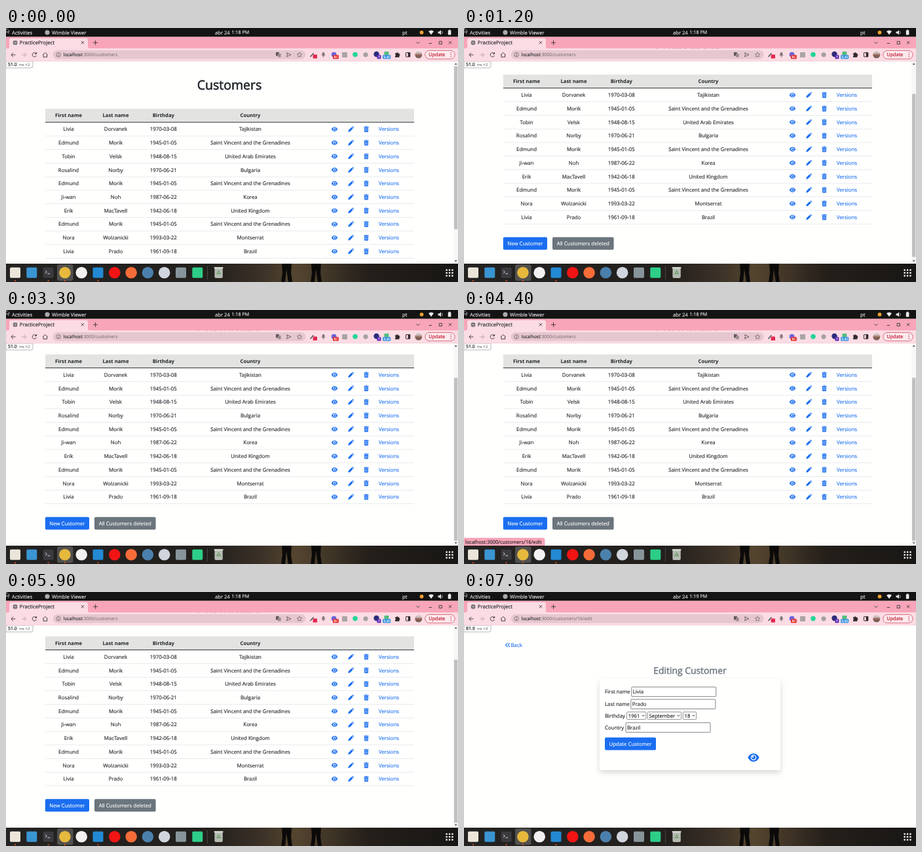
An HTML page that plays this animation: 690x388 px, repeating every 8 s.

```html
<!DOCTYPE html>
<html lang="en">
<head>
<meta charset="utf-8">
<title>Customers</title>
<style>
html, body { margin: 0; width: 100%; height: 100%; overflow: hidden; background: #fffffe; }
svg { display: block; width: 690px; height: 388px; }
text { font-family: "Open Sans", "Noto Sans", sans-serif; text-rendering: geometricPrecision; white-space: pre; }
</style>
</head>
<body>
<svg id="stage" viewBox="0 0 690 388"></svg>
<script>
const LOOP = 8000, STEP = 100, SCROLL = 55.6;
const BLUE = '#1a6ef0', INK = '#212529', GREY = '#6c757d', PINK = '#f8a5b9', PALE = '#fcdce4';

// Text is placed by its vertical middle; a thin stroke gives it a slightly heavier weight.
const text = (x, y, s, { size = 7.85, fill = INK, anchor = 'start', weight = 400, stroke = .14, id = '' } = {}) =>
  `<text id="${id}" x="${x}" y="${y + size * 0.36}" font-size="${size}" fill="${fill}" stroke="${fill}" stroke-width="${stroke}"
    text-anchor="${anchor}" font-weight="${weight}">${s}</text>`;
const mid = (x, y, s, options) => text(x, y, s, { anchor: 'middle', ...options });
const rect = (x, y, w, h, fill, r = 0, extra = '') =>
  `<rect x="${x}" y="${y}" width="${w}" height="${h}" rx="${r}" fill="${fill}" ${extra}/>`;
const dot = (x, y, r, fill, extra = '') => `<circle cx="${x}" cy="${y}" r="${r}" fill="${fill}" ${extra}/>`;
const path = (d, fill, extra = '') => `<path d="${d}" fill="${fill}" ${extra}/>`;
const line = (d, color = '#4a3f43', width = 1) => path(d, 'none', `stroke="${color}" stroke-width="${width}"`);
const at = (x, y, body, more = '') => `<g transform="translate(${x} ${y}) ${more}">${body}</g>`;
const group = (id, body) => `<g id="${id}">${body}</g>`;

const eye = path('M-4.7 0C-2.6-4.6 2.6-4.6 4.7 0C2.6 4.6-2.6 4.6-4.7 0Z', BLUE)
  + dot(0, 0, 2.3, '#fff') + dot(0, 0, 1.6, BLUE) + dot(-.6, -.6, .7, '#fff');
const pencil = path('M-4.2 4.2L-3.6 1.4L1-3.2L3.2-1L-1.4 3.6ZM1.6-3.7L2.4-4.3Q3-4.6 4.3-3.1Q4.6-2.5 3.8-1.6Z', BLUE);
const trash = path('M-3.6-3.8H-1.3L-.9-4.4H.9L1.3-3.8H3.6V-2.7H-3.6ZM-3.1-2.2H3.1L2.8 4.3H-2.8Z', BLUE)
  + line('M-1.3-1V3M0-1V3M1.3-1V3', '#fff', .5);

const button = (x, y, w, s, fill) => rect(x, y, w, 19.2, fill, 2) + mid(x + w / 2, y + 9.6, s, { fill: '#fff' });

function customersPage() {
  const saint = ['Edmund', 'Morik', '1945-01-05', 'Saint Vincent and the Grenadines'];
  const customers = [
    ['Livia', 'Dorvanek', '1970-03-08', 'Tajikistan'],
    saint,
    ['Tobin', 'Velsk', '1948-08-15', 'United Arab Emirates'],
    ['Rosalind', 'Norby', '1970-06-21', 'Bulgaria'],
    saint,
    ['Ji-wan', 'Noh', '1987-06-22', 'Korea'],
    ['Erik', 'MacTavell', '1942-06-18', 'United Kingdom'],
    saint,
    ['Nora', 'Wolzanicki', '1993-03-22', 'Montserrat'],
    ['Livia', 'Prado', '1961-09-18', 'Brazil'],
  ];
  const columns = [95.5, 167.5, 240.3, 373];
  const cells = (row, y, options) => row.map((s, i) => mid(columns[i], y, s, options)).join('');
  const rows = customers.map((row, i) => {
    const y = 154.6 + i * 20.72;
    return cells(row, y) + at(501.5, y, eye) + at(526.5, y, pencil) + at(550, y, trash)
      + mid(584.5, y, 'Versions', { fill: BLUE }) + rect(60, y + 10.1, 563, .6, '#d9dddf');
  }).join('');
  return mid(341, 86.8, 'Customers', { size: 19.5, stroke: .6 })
    + rect(60, 123.4, 563, 20.4, '#e3e4e2')
    + cells(['First name', 'Last name', 'Birthday', 'Country'], 133.4, { size: 7.7, weight: 700, stroke: 0 })
    + rows + rect(60, 143.5, 563, 1, '#2b2f33')
    + button(59.8, 371.8, 67.2, 'New Customer', BLUE)
    + button(135, 371.8, 93.6, 'All Customers deleted', GREY);
}

function editPage() {
  const field = (y, label, x, value) => text(215, y, label)
    + rect(x, y - 7.3, 129, 14.6, '#fff', 1, 'stroke="#767676" stroke-width=".9"') + text(x + 2, y, value);
  const select = (x, w, value) => rect(x, 183.2, w, 11.4, '#fff', 1.2, 'stroke="#767676" stroke-width=".8"')
    + text(x + 2.4, 189, value, { size: 7.7 }) + line(`M${x + w - 6} 188l1.8 1.8l1.8-1.8`, '#222', 1);
  return line('M66.5 77.8L63.6 81L66.5 84.2M70 77.8L67.1 81L70 84.2', BLUE, 1.1)
    + text(71.5, 81, 'Back', { fill: BLUE })
    + mid(345, 120, 'Editing Customer', { size: 13.9, stroke: .45, fill: GREY })
    + rect(207, 132.5, 276, 139.5, '#fffffe', 2, 'filter="url(#shadow)"')
    + field(152.4, 'First name', 255.8, 'Livia') + field(171.3, 'Last name', 254.8, 'Prado')
    + text(215, 189, 'Birthday')
    + select(248.4, 29.4, '1961') + select(280.2, 51.4, 'September') + select(334.2, 20.4, '18')
    + field(207, 'Country', 247, 'Brazil')
    + button(215, 222.3, 78, 'Update Customer', BLUE)
    + at(442, 252.8, eye, 'scale(1.85)');
}

const timing = (id, ms, count) => group(id,
  path('M0 51H41V58Q41 61 38 61H0Z', '#fff', 'stroke="#999" stroke-width=".7"')
  + text(3, 55.8, ms, { size: 6.9, stroke: .2 })
  + text(19.8, 55.9, 'ms', { size: 5.6, fill: '#777' })
  + text(29.6, 55.9, count, { size: 5.8, fill: '#777' }));

const scrollbar = group('scrollbar', rect(683.3, 51, 6.7, 309, '#f7f7f7')
  + path('M684.7 56L686.7 53.5L688.7 56Z', '#555') + path('M684.7 354.8L686.7 357.3L688.7 354.8Z', '#555')
  + rect(684, 58.5, 5.4, 249, '#c1c1c1', 0, 'id="thumb"'));

function topBar() {
  const white = { fill: '#e8e8e8', size: 7.6 };
  return rect(0, 0, 690, 13.6, '#141414')
    + text(9, 6.8, 'Activities', white) + dot(63, 6.8, 3.6, '#aaa') + text(70, 6.8, 'Wimble Viewer', white)
    + text(319, 6.8, 'abr 24', white) + text(371.2, 6.8, '', { ...white, size: 7.1, anchor: 'end', id: 'clock' })
    + text(605, 6.8, 'pt', white) + dot(634.5, 6.8, 2.9, '#f0a030')
    + path('M645 5Q649 1.8 653 5L649 10.2Z', '#eee')
    + path('M659.5 5.5H661.5L664 3.2V10.4L661.5 8.2H659.5Z', '#eee') + line('M665.3 4.7Q667 6.8 665.3 8.9', '#eee', .8)
    + rect(674.8, 3.6, 4.6, 7, '#eee', .8) + rect(676, 2.6, 2.2, 1.2, '#eee')
    + path('M0 0L0 7L2 5.4L3.4 8.4L4.6 7.8L3.2 5H5.6Z', '#111', 'stroke="#ddd" stroke-width=".6"');
}

function tabStrip() {
  return rect(0, 13.6, 690, 18, PINK)
    + path('M2 32Q5 32 5 28V19Q5 15.6 8 15.6H122Q125 15.6 125 19V28Q125 32 128 32Z', PALE)
    + dot(14, 22.4, 3.4, '#5f6368') + line('M10.8 22.4H17.2M14 19V25.8', PALE, .6)
    + text(20.8, 22.4, 'PracticeProject', { size: 7.7 })
    + line('M114.8 20.2L119 24.4M119 20.2L114.8 24.4') + line('M133 22.4H140M136.5 18.9V25.9')
    + line('M626.5 21.2L629 23.7L631.5 21.2M645.6 23.5H650M661.2 20.4H665.4V24.6H661.2ZM676 20.2L680.2 24.4M680.2 20.2L676 24.4');
}

function toolbar() {
  const badge = (x, y, s, fill, w) => rect(x - w / 2, y - 3, w, 6, fill, 1.2)
    + mid(x, y, s, { size: 4.7, fill: '#fff', weight: 700, stroke: 0 });
  return rect(0, 31.4, 690, 19.6, PALE) + rect(0, 50.6, 690, .5, '#e5c8cf')
    + line('M14.5 41H8M11 37.8L7.8 41L11 44.2') + line('M24 41H30.5M27.5 37.8L30.7 41L27.5 44.2', '#c3a3ab')
    + line('M46 39A3.2 3.2 0 1 0 46.4 42M46.6 37V39.6H44') + line('M56 41L59.8 37.6L63.6 41M57 40.5V44.3H62.6V40.5')
    + rect(71.5, 34, 386, 13.6, '#e6c7cf', 6.8)
    + line('M80 40.3V43.2M80 38.3V39.2', '#5f5558', .8) + dot(80, 40.8, 3.2, 'none', 'stroke="#5f5558" stroke-width=".7"')
    + text(87.7, 40.8, 'localhost<tspan id="route" fill="#6d6064" stroke="none"></tspan>', { size: 6.9 })
    + rect(412, 37, 4.8, 5.6, '#5f5558', .6) + rect(415, 39, 4.6, 5.6, '#9c8d92', .6)
    + line('M428.5 37.8L435 40.8L428.5 43.8L429.5 40.8Z', '#5f5558', .9)
    + line('M448 37.2L449.1 39.6L451.7 39.9L449.8 41.7L450.3 44.2L448 42.9L445.7 44.2L446.2 41.7L444.3 39.9L446.9 39.6Z', '#5f5558', .7)
    + line('M464.5 44L469.5 38.5', '#555', 1.6) + rect(468.6, 40.6, 6.4, 6, '#e0284f', 1.2)
    + rect(482.6, 37, 3.8, 5.4, '#7d7679', 1.9) + line('M481.4 41Q484.5 45 487.6 41M484.5 43V45', '#7d7679', .8)
    + dot(500.6, 40.6, 3.9, '#6b63d8') + badge(503.4, 44.2, '9+', '#e53935', 9)
    + rect(513, 36.9, 8, 8, '#aaa4a6', 1) + dot(533, 40.6, 3.8, '#27d59a') + dot(549, 40.8, 3.6, '#a5a1a3')
    + dot(565.5, 40, 4.2, '#2c2c7a') + badge(569.4, 44.2, '7', '#5b2bb5', 6)
    + rect(577.4, 36, 7, 5.5, '#52bd7c', 1) + badge(581.2, 44.2, '5,43', '#2f8fdf', 12)
    + path('M594 38.4H596.2Q597 35.2 598.2 38.4H600.4V40.3Q603 41.3 600.4 42.5V44.8H594V42.6Q596.4 41.4 594 40.4Z', '#30282b')
    + rect(610.4, 37.6, 6.4, 6.4, 'none', .5, 'stroke="#30282b"') + rect(613.7, 37.6, 3.2, 6.4, '#30282b')
    + dot(629.8, 40.8, 5.5, 'url(#avatar)')
    + rect(639.8, 34.4, 45.4, 12.8, '#fdeaee', 6.4, 'stroke="#c5374a" stroke-width=".7"')
    + text(645.2, 40.8, 'Update', { size: 7.3, fill: '#c5283d', stroke: .25 })
    + [38, 40.8, 43.6].map(y => dot(679.2, y, .75, '#c5283d')).join('');
}

function dock() {
  const icons = [
    ['square', '#ebe6d9'], ['square', '#3a95d2'], ['square', '#3b3b3f'], ['circle', '#e6b83c'],
    ['circle', '#f3f1f1'], ['square', '#2389d4'], ['circle', '#f21414'], ['circle', '#f66c38'],
    ['circle', '#4b80ac'], ['circle', '#d0d5de'], ['square', '#87959b'], ['square', '#2dce88'],
  ];
  const legs = x => path(`M${x} 360H${x + 15}L${x + 14} 374L${x + 16} 388H${x + 10}L${x + 7} 368L${x + 5} 388H${x - 1}L${x + 1} 374Z`, '#0b0a09');
  return rect(0, 360, 690, 28, 'url(#dusk)') + legs(421) + legs(466)
    + rect(78, 361.2, 24.5, 25, '#51504e', 3)
    + icons.map(([kind, fill], i) => {
      const x = 14 + i * 25.3;
      return kind === 'circle' ? dot(x, 373.8, 8.8, fill) : rect(x - 8, 365.8, 16, 16, fill, 1.8);
    }).join('')
    + line('M60 370.5L62.4 372.7L60 374.9M63.5 375.3H67', '#eee', .9)
    + [14, 64.6, 89.9, 140.5].map(x => dot(x, 386, 1.1, '#e95420')).join('')
    + rect(307, 364, .6, 20, '#66625e')
    + rect(318.4, 366, 12.4, 16, '#b5bab2', 2) + rect(317.6, 365.2, 14, 2.4, '#dce0d8', 1)
    + line('M322 375.5L324.6 371L327.2 375.5Z', '#5c9a58', 1.1)
    + [0, 1, 2].flatMap(i => [0, 1, 2].map(j => rect(671.4 + i * 4.4, 368.4 + j * 4.4, 2.5, 2.5, '#eee', .6))).join('');
}

const status = group('status', path('M0 348H120Q123.5 348 123.5 351.5V360H0Z', PINK)
  + text(2, 354, 'localhost:3000/customers/16/edit', { size: 7.45 }));

document.getElementById('stage').innerHTML = `<defs>
  <linearGradient id="dusk"><stop offset="0" stop-color="#242322"/><stop offset=".45" stop-color="#221f1c"/>
    <stop offset=".56" stop-color="#3a3027"/><stop offset=".64" stop-color="#54452f"/><stop offset=".72" stop-color="#3f3426"/>
    <stop offset=".8" stop-color="#241f1a"/><stop offset="1" stop-color="#181614"/></linearGradient>
  <linearGradient id="avatar" x2="0" y2="1"><stop offset=".2" stop-color="#cfc6c3"/><stop offset=".6" stop-color="#8d5a4e"/><stop offset="1" stop-color="#6d6a66"/></linearGradient>
  <filter id="shadow" x="-10%" y="-15%" width="120%" height="135%"><feDropShadow dx="0" dy="4" stdDeviation="4" flood-opacity=".15"/></filter>
</defs>` + rect(0, 0, 690, 388, '#fffffe')
  + group('list', customersPage()) + group('edit', editPage()) + scrollbar
  + timing('timingList', '51.0', '×2') + timing('timingEdit', '81.9', '×3')
  + topBar() + tabStrip() + toolbar() + dock() + status;

const el = Object.fromEntries([...document.querySelectorAll('[id]')].map(node => [node.id, node]));
const ramp = (t, from, to) => Math.min(1, Math.max(0, (t - from) / (to - from)));
const ease = u => u * u * (3 - 2 * u);
const show = (node, on) => node.setAttribute('visibility', on ? 'visible' : 'hidden');

function draw(now) {
  const t = Math.floor(now % LOOP / STEP) * STEP;
  const editing = t >= 7400;
  const scroll = ease(ramp(t, 985, 1238));
  el.list.setAttribute('transform', `translate(0 ${-SCROLL * scroll})`);
  el.thumb.setAttribute('y', 58.5 + 45 * scroll);
  show(el.list, !editing);
  show(el.scrollbar, !editing);
  show(el.timingList, !editing);
  show(el.edit, editing);
  show(el.timingEdit, t >= 7700);
  el.clock.textContent = t < 6700 ? '1:18 PM' : '1:19 PM';
  el.route.textContent = ':3000/customers' + (editing ? '/16/edit' : '');
  const hover = t < 6000 ? ramp(t, 3700, 3900) - ramp(t, 5500, 5900) : ramp(t, 6400, 6500) - ramp(t, 7600, 7900);
  el.status.setAttribute('opacity', hover);
  requestAnimationFrame(() => draw(performance.now()));
}
draw(0);
</script>
</body>
</html>
```
